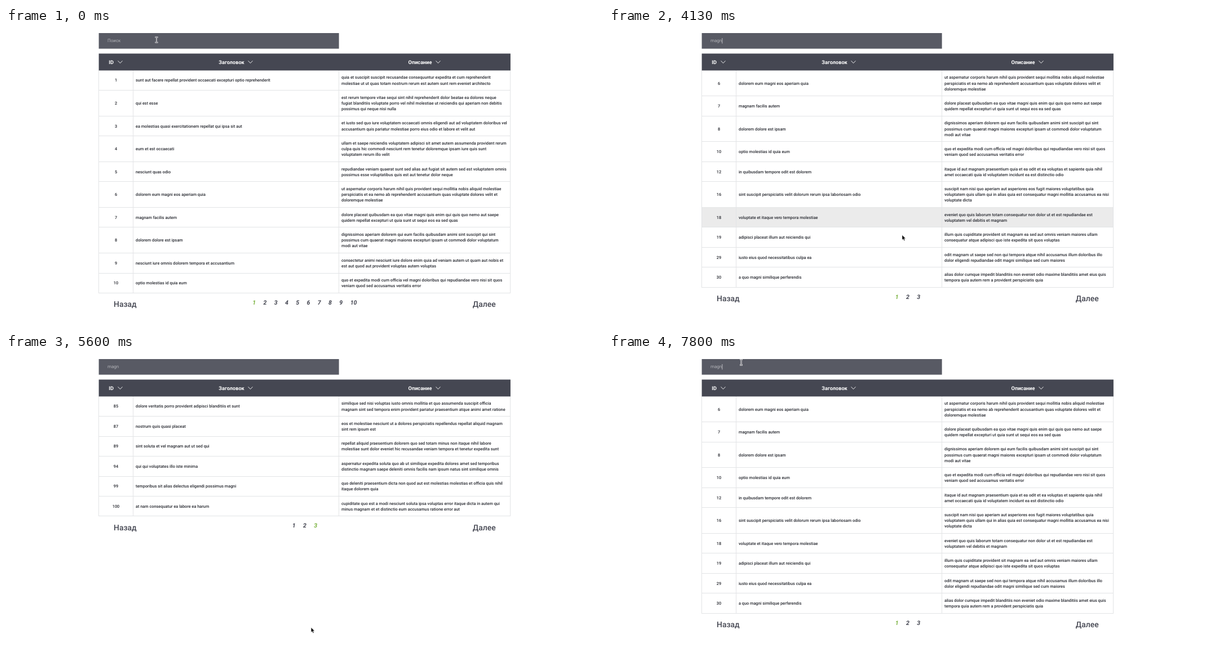
These frames come from a looping animation (1059 px wide and 529 px high, 8000 ms). An HTML page:

```html
<!DOCTYPE html>
<html lang="ru">
<head>
<meta charset="utf-8">
<title>Таблица с поиском</title>
<style>
html, body { margin: 0; width: 100%; height: 100%; overflow: hidden; background: #fff; }
svg { display: block; font: 500 7.34px Roboto, sans-serif; fill: #26282f; text-rendering: geometricPrecision; }
.line { fill: #e2e4e6; }
.head { font-size: 9.2px; font-weight: 700; fill: #fff; }
.chevron { fill: none; stroke: #fff; stroke-width: .9; }
.field { font-size: 8px; font-weight: 400; fill: #b2b3b8; }
.nav { font-size: 13.9px; fill: #454752; }
.page { font-size: 10.6px; font-weight: 700; font-style: italic; fill: #454752; }
.page .active { fill: #7cb342; }
.mid { text-anchor: middle; }
</style>
</head>
<body>
<svg width="1059" height="529" viewBox="0 0 1059 529">
  <rect x="164.6" y="9" width="426" height="27.7" fill="#585a64"/>
  <g id="table"></g>
  <rect x="164.6" y="45.4" width="730.3" height="30" fill="#454752"/>
  <g class="head">
    <text x="182.3" y="63.6">ID</text>
    <text x="377.3" y="63.6">Заголовок</text>
    <text x="713.6" y="63.6">Описание</text>
  </g>
  <path class="chevron" d="M198.5 58.2l4 4.2 4-4.2M429.5 58.2l4 4.2 4-4.2M762.5 58.2l4 4.2 4-4.2"/>
  <text id="query" class="field" x="180" y="25.1"></text>
  <rect id="caret" y="18" width=".8" height="9.6" fill="#d4d4d8"/>
  <g id="beam" fill="none">
    <path id="beamShape" d="M-2.4-4.7H-.7L0-4.2.7-4.7H2.4M0-4.2V4.2M-2.4 4.7H-.7L0 4.2.7 4.7H2.4" stroke="#dcdcde" stroke-width="1.8"/>
    <use href="#beamShape"/>
    <path d="M-2-4.7H2M0-4.2V4.2M-2 4.7H2" stroke="#45464e" stroke-width=".6"/>
  </g>
  <path id="arrow" d="M0 0V8.7L2 6.9 3.4 10.1 4.9 9.4 3.5 6.3H6.2Z" fill="#000" stroke="#fff" stroke-width=".5"/>
</svg>
<script>
// id | title | description lines
const posts = {};
`1|sunt aut facere repellat provident occaecati excepturi optio reprehenderit|quia et suscipit suscipit recusandae consequuntur expedita et cum reprehenderit/molestiae ut ut quas totam nostrum rerum est autem sunt rem eveniet architecto
2|qui est esse|est rerum tempore vitae sequi sint nihil reprehenderit dolor beatae ea dolores neque/fugiat blanditiis voluptate porro vel nihil molestiae ut reiciendis qui aperiam non debitis/possimus qui neque nisi nulla
3|ea molestias quasi exercitationem repellat qui ipsa sit aut|et iusto sed quo iure voluptatem occaecati omnis eligendi aut ad voluptatem doloribus vel/accusantium quis pariatur molestiae porro eius odio et labore et velit aut
4|eum et est occaecati|ullam et saepe reiciendis voluptatem adipisci sit amet autem assumenda provident rerum/culpa quis hic commodi nesciunt rem tenetur doloremque ipsam iure quis sunt/voluptatem rerum illo velit
5|nesciunt quas odio|repudiandae veniam quaerat sunt sed alias aut fugiat sit autem sed est voluptatem omnis/possimus esse voluptatibus quis est aut tenetur dolor neque
6|dolorem eum magni eos aperiam quia|ut aspernatur corporis harum nihil quis provident sequi mollitia nobis aliquid molestiae/perspiciatis et ea nemo ab reprehenderit accusantium quas voluptate dolores velit et/doloremque molestiae
7|magnam facilis autem|dolore placeat quibusdam ea quo vitae magni quis enim qui quis quo nemo aut saepe/quidem repellat excepturi ut quia sunt ut sequi eos ea sed quas
8|dolorem dolore est ipsam|dignissimos aperiam dolorem qui eum facilis quibusdam animi sint suscipit qui sint/possimus cum quaerat magni maiores excepturi ipsam ut commodi dolor voluptatum/modi aut vitae
9|nesciunt iure omnis dolorem tempora et accusantium|consectetur animi nesciunt iure dolore enim quia ad veniam autem ut quam aut nobis et/est aut quod aut provident voluptas autem voluptas
10|optio molestias id quia eum|quo et expedita modi cum officia vel magni doloribus qui repudiandae vero nisi sit quos/veniam quod sed accusamus veritatis error
11|et ea vero quia laudantium autem|delectus reiciendis molestiae occaecati non minima eveniet qui voluptatibus accusamus/in eum beatae sit vel qui neque voluptates ut commodi qui incidunt ut animi commodi
12|in quibusdam tempore odit est dolorem|itaque id aut magnam praesentium quia et ea odit et ea voluptas et sapiente quia nihil/amet occaecati quia id voluptatem incidunt ea est distinctio odio
13|dolorum ut in voluptas mollitia et saepe quo animi|aut dicta possimus sint mollitia voluptas commodi quo doloremque iste corrupti/reiciendis voluptatem eius rerum sit cumque quod eligendi laborum minima perferendis/recusandae assumenda consectetur porro architecto ipsum ipsam
15|eveniet quod temporibus|reprehenderit quos placeat velit minima officia dolores impedit repudiandae molestiae/nam voluptas recusandae quis delectus officiis harum fugiat vitae
16|sint suscipit perspiciatis velit dolorum rerum ipsa laboriosam odio|suscipit nam nisi quo aperiam aut asperiores eos fugit maiores voluptatibus quia/voluptatem quis ullam qui in alias quia est consequatur magni mollitia accusamus ea nisi/voluptate dicta
18|voluptate et itaque vero tempora molestiae|eveniet quo quis laborum totam consequatur non dolor ut et est repudiandae est/voluptatem vel debitis et magnam
19|adipisci placeat illum aut reiciendis qui|illum quis cupiditate provident sit magnam ea sed aut omnis veniam maiores ullam/consequatur atque adipisci quo iste expedita sit quos voluptas
29|iusto eius quod necessitatibus culpa ea|odit magnam ut saepe sed non qui tempora atque nihil accusamus illum doloribus illo/dolor eligendi repudiandae odit magni similique sed cum maiores
30|a quo magni similique perferendis|alias dolor cumque impedit blanditiis non eveniet odio maxime blanditiis amet eius quis/tempora quia autem rem a provident perspiciatis quia
34|magnam ut rerum iure|ea velit perferendis earum ut voluptatem voluptate itaque iusto totam pariatur in nemo/voluptatem voluptatem autem magni tempora minima in est distinctio qui assumenda/accusamus dignissimos officia nesciunt nobis
43|eligendi iste nostrum consequuntur adipisci praesentium sit beatae perferendis|similique fugit est illum et dolorum harum et voluptate eaque quidem exercitationem quos/nam commodi possimus cum odio nihil nulla dolorum exercitationem magnam ex et a et/distinctio debitis
59|qui commodi dolor at maiores et quis id accusantium|perspiciatis et quam ea autem temporibus non voluptatibus qui beatae a earum officia/nesciunt dolores suscipit voluptas et animi doloribus cum rerum quas et magni et hic ut/ut commodi expedita sunt
61|voluptatem doloribus consectetur est ut ducimus|ab nemo optio odio delectus tenetur corporis similique nobis repellendus rerum omnis/facilis vero blanditiis debitis in nesciunt doloribus dicta dolores magnam minus velit
68|odio quis facere architecto reiciendis optio|magnam molestiae perferendis quisquam qui cum reiciendis quaerat animi amet hic/inventore ea quia deleniti quidem saepe porro velit
70|voluptatem laborum magni|sunt repellendus quae est asperiores aut deleniti esse accusamus repellendus quia aut/quia dolorem unde eum tempora esse dolore
74|enim unde ratione doloribus quas enim ut sit sapiente|odit qui et et necessitatibus sint veniam mollitia amet doloremque molestiae commodi/similique magnam et quam blanditiis est itaque quo et tenetur ratione occaecati/molestiae tempora
75|dignissimos eum dolor ut enim et delectus in|commodi non non omnis et voluptas sit autem aut nobis magnam et sapiente voluptatem/et laborum repellat qui delectus facilis temporibus rerum amet et nemo voluptate/expedita adipisci error dolorem
79|pariatur consequatur quia magnam autem omnis non amet|libero accusantium et et facere incidunt sit dolorem non excepturi qui quia sed/laudantium quisquam molestiae ducimus est officiis esse molestiae iste et quos
84|optio ipsam molestias necessitatibus occaecati facilis veritatis dolores aut|sint molestiae magni a et quos eaque et quasi ut rerum debitis similique veniam/recusandae dignissimos dolor incidunt consequatur odio
85|dolore veritatis porro provident adipisci blanditiis et sunt|similique sed nisi voluptas iusto omnis mollitia et quo assumenda suscipit officia/magnam sint sed tempora enim provident pariatur praesentium atque animi amet ratione
87|nostrum quis quasi placeat|eos et molestiae nesciunt ut a dolores perspiciatis repellendus repellat aliquid magnam/sint rem ipsum est
89|sint soluta et vel magnam aut ut sed qui|repellat aliquid praesentium dolorem quo sed totam minus non itaque nihil labore/molestiae sunt dolor eveniet hic recusandae veniam tempora et tenetur expedita sunt
94|qui qui voluptates illo iste minima|aspernatur expedita soluta quo ab ut similique expedita dolores amet sed temporibus/distinctio magnam saepe deleniti omnis facilis nam ipsum natus sint similique omnis
99|temporibus sit alias delectus eligendi possimus magni|quo deleniti praesentium dicta non quod aut est molestias molestias et officia quis nihil/itaque dolorem quia
100|at nam consequatur ea labore ea harum|cupiditate quo est a modi nesciunt soluta ipsa voluptas error itaque dicta in autem qui/minus magnam et et distinctio eum accusamus ratione error aut`
  .split('\n').forEach(row => {
    const [id, title, body] = row.split('|');
    posts[id] = { id, title, lines: body.split('/') };
  });

const view = (ids, page, pages) => ({ rows: ids.split(' ').map(id => posts[id]), page, pages });
const all = view('1 2 3 4 5 6 7 8 9 10', 1, 10);
const broad = view('6 7 8 10 11 12 13 15 16 18', 1, 5);
const first = view('6 7 8 10 12 16 18 19 29 30', 1, 3);
const second = view('34 43 59 61 68 70 74 75 79 84', 2, 3);
const third = view('85 87 89 94 99 100', 3, 3);

const LOOP = 8000, TICK = 200 / 3;
// Tables of [tick, value]; each value holds until the next entry.
const views = [[0, all], [34, broad], [38, first], [72, second], [82, third], [97, first]];
const typed = [[0, ''], [27, 'm'], [34, 'ma'], [38, 'mag'], [42, 'magn']];
const blink = [[0, 0], [10, 1], [18, 0], [26, 1], [50, 0], [58, 1], [66, 0], [117, 1]];
// Pointer path: [tick, x, y]
const path = [[0, 267, 21], [1, 267, 21.5], [9, 267, 21.5], [10, 268.5, 21], [60, 268.5, 21],
  [61, 478, 337], [62, 520, 367.5], [63, 536, 425], [65, 543, 478], [67, 539, 485.5], [69, 531.5, 477.5],
  [72, 531.5, 477.5], [73, 531.5, 478], [75, 531.5, 478], [80, 548, 495], [83, 548, 496], [88, 514, 443],
  [92, 504.5, 345], [95, 511, 306], [101, 511, 306], [107, 410, 200], [114, 229, 46.5],
  [115, 231, 40], [117, 234.5, 14.8], [120, 234.5, 14.8]];

const el = id => document.getElementById(id);
const at = (table, tick) => table.filter(([start]) => start <= tick).pop()[1];

function pointer(tick) {
  const i = Math.max(1, path.findIndex(([t]) => t >= tick));
  const [t0, x0, y0] = path[i - 1], [t1, x1, y1] = path[i];
  const p = (tick - t0) / (t1 - t0);
  return [x0 + (x1 - x0) * p, y0 + (y1 - y0) * p];
}

const text = (x, y, value, cls = '') => `<text x="${x}" y="${y}" class="${cls}">${value}</text>`;
const line = (x, y, w, h) => `<rect class="line" x="${x}" y="${y}" width="${w}" height="${h}"/>`;

function drawTable({ rows, page, pages }, hoverY) {
  let y = 75.2, out = '';
  for (const { id, title, lines } of rows) {
    const height = 15.05 + 10.2 * lines.length, base = y + height / 2 + 2.5;
    if (hoverY > y && hoverY < y + height)
      out += `<rect x="164.6" y="${y}" width="730.3" height="${height}" fill="#ebebeb"/>`;
    out += text(195, base, id, 'mid') + text(230, base, title);
    lines.forEach((s, i) => out += text(595, base + 10.2 * (i - (lines.length - 1) / 2), s));
    y += height;
    out += line(164, Math.floor(y), 731, 1);
  }
  for (const x of [164, 225, 590, 894]) out += line(x, 75, 1, Math.floor(y) - 74);

  const step = 19.25, left = 530 - (pages * step + (pages > 9 ? 6.1 : 0)) / 2;
  out += '<g class="page">';
  for (let n = 1; n <= pages; n++)
    out += text(left + step * (n - .5) + (n > 9 ? 3.05 : 0), y + 20.2, n, n === page ? 'mid active' : 'mid');
  return out + '</g>' + text(191, y + 24.6, 'Назад', 'nav') + text(827.8, y + 24.6, 'Далее', 'nav');
}

function draw(tick) {
  const [x, y] = pointer(tick);
  const hoverY = pointer(Math.max(0, tick - 1))[1];   // row highlight trails the pointer
  el('table').innerHTML = drawTable(at(views, tick), hoverY);

  const word = at(typed, tick), query = el('query');
  query.textContent = word || 'Поиск';
  el('caret').setAttribute('x', 180.2 + (word ? query.getComputedTextLength() : 0));
  el('caret').style.opacity = at(blink, tick);

  const inField = y < 37;
  el('beam').style.display = inField ? '' : 'none';
  el('arrow').style.display = inField ? 'none' : '';
  el(inField ? 'beam' : 'arrow').setAttribute('transform', `translate(${x} ${y})`);
}

let shown = -1;
const start = performance.now();
function frame() {
  const time = (performance.now() - start) % LOOP;
  const tick = Math.min(119, Math.floor((time + 5) / TICK));
  if (tick !== shown) draw(shown = tick);
  requestAnimationFrame(frame);
}
frame();
</script>
</body>
</html>
```
